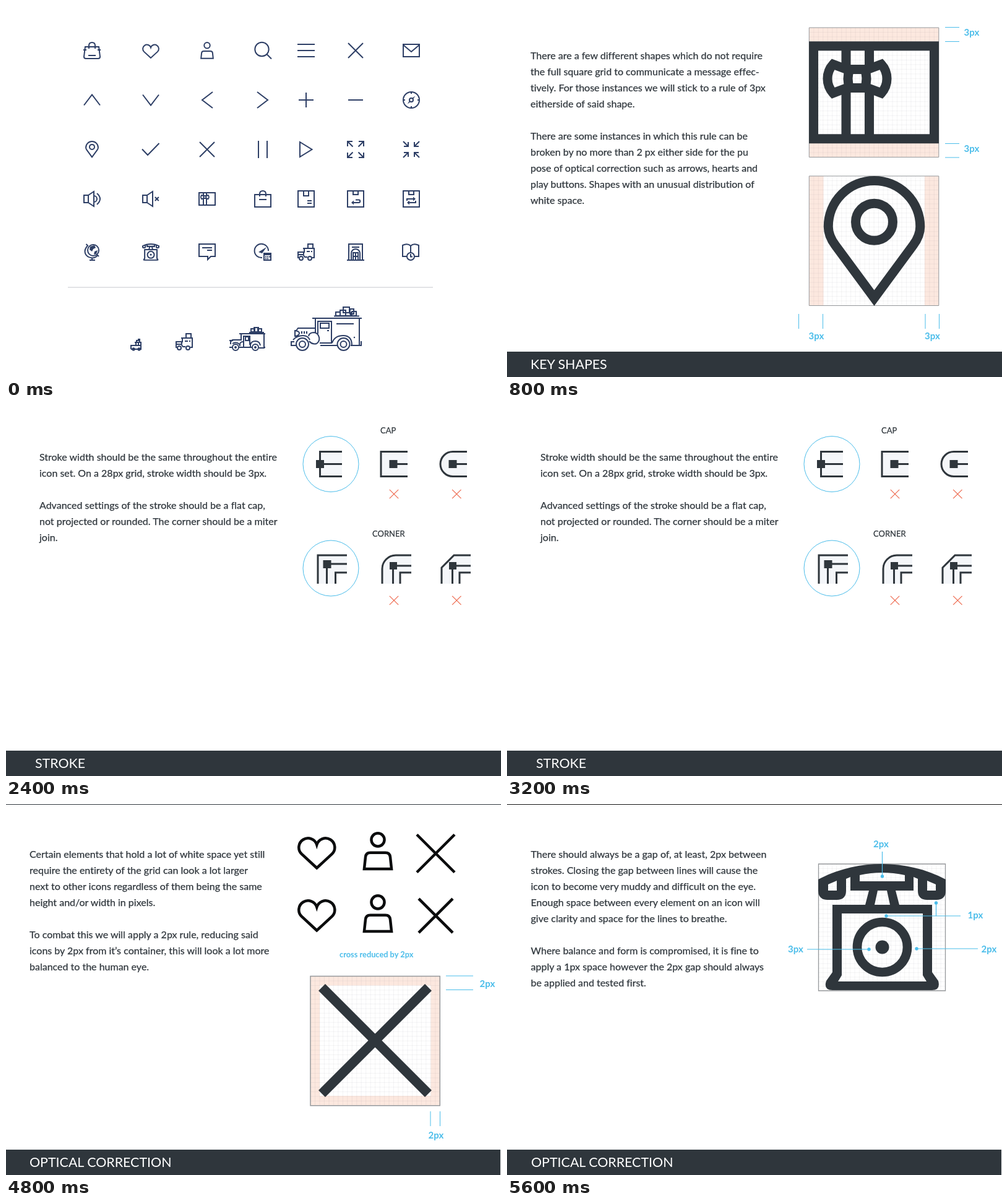
Animation, 800 px wide and 600 px high, one loop 6.4 s. Source, as an HTML page:

```html
<!DOCTYPE html>
<html lang="en">
<head>
<meta charset="utf-8">
<title>Icon guidelines</title>
<style>
html, body { margin: 0; width: 100%; height: 100%; overflow: hidden; background: #fff; }
svg { display: block; width: 800px; height: 600px; }
text { font-family: Lato, "Open Sans", sans-serif; font-variant-ligatures: none; }
.body { font-size: 16px; fill: #2f363c; stroke: #2f363c; stroke-width: .25px; }
.title { font-size: 21.4px; fill: #fff; }
.cap { font-size: 13px; fill: #2f363c; stroke: #2f363c; stroke-width: .2px; }
.note { font-size: 15px; font-weight: 700; fill: #4bbdea; }
.small { font-size: 12.8px; }
</style>
</head>
<body>
<svg id="stage" viewBox="0 0 800 600"></svg>
<script>
const DARK = '#2f363c', BLUE = '#4bbdea', NAVY = '#2e3f66', PEACH = '#fce8df', RED = '#ee6a4f';
const HOLD = 800, LOOP = 6400;

// drawing helpers
const line = (d, color, w = 1) => `<path d="${d}" fill="none" stroke="${color}" stroke-width="${w}"/>`;
const fill = (d, color) => `<path d="${d}" fill="${color}" fill-rule="evenodd"/>`;
const box = (x, y, w, h, color) => `<rect x="${x}" y="${y}" width="${w}" height="${h}" fill="${color}"/>`;
const dot = (x, y, r, color) => `<circle cx="${x}" cy="${y}" r="${r}" fill="${color}"/>`;
const ring = (x, y, r, color, w) =>
  `<circle cx="${x}" cy="${y}" r="${r}" fill="none" stroke="${color}" stroke-width="${w}"/>`;
const at = (x, y, s, inner) => `<g transform="translate(${x} ${y}) scale(${s})">${inner}</g>`;
const text = (x, y, cls, s) => `<text x="${x}" y="${y}" class="${cls}">${s}</text>`;
const rect = (x, y, w, h) => `M${x} ${y}h${w}v${h}h${-w}Z`;
const circ = (x, y, r) => `M${x - r} ${y}a${r} ${r} 0 1 0 ${2 * r} 0a${r} ${r} 0 1 0 ${-2 * r} 0Z`;
const cross = (x, y, r) =>
  `M${x - r} ${y - r}L${x + r} ${y + r}M${x + r} ${y - r}L${x - r} ${y + r}`;

const copy = (x, y, s) => s.split('\n').map((t, i) => t && text(x, y + i * 26, 'body', t)).join('');
const footer = (x, s, w = 800) => box(0, 559, w, 41, DARK) + text(x, 587, 'title', s);

function grid(x, y, size) {
  let d = '';
  for (let i = 1; i < 28; i++) {
    const p = size * i / 28;
    d += `M${x + p} ${y}v${size}M${x} ${y + p}h${size}`;
  }
  return line(d, 'rgba(40,50,60,.05)');
}
const frame = (x, y, size, w = 1) => line(rect(x, y, size, size), '#95989b', w);

// icons on a 28 unit grid, centred on 0,0
const heart = c => line('M0 12L-10.97 1.87A6.6 6.6 0 1 1 0 -4.77A6.6 6.6 0 1 1 10.97 1.87Z', c, 2);
const person = c => line(circ(0, -8.3, 4.7) +
  'M-9.8 12.7L-8.9 4.2Q-8.6 1 -5.4 1H5.4Q8.6 1 8.9 4.2L9.8 12.7Z', c, 2);
const pin = c => line('M0 12.3L-8.4 .9C-9.3 -.3 -9.9 -1.6 -9.9 -3.1A9.9 9.9 0 0 1 9.9 -3.1' +
  'C9.9 -1.6 9.3 -.3 8.4 .9Z' + circ(0, -4.1, 4), c, 2);
const wing = 'M-2 -1.9L-5.2 -3.1A4.6 4.6 0 0 0 -5.2 3.1L-2 1.9';
const gift = c => line(rect(-13, -10, 26, 20) + 'M-6 -11V-5.5M-1 -11V-5.5M-6 -.5V11M-1 -.5V11', c, 2) +
  at(-3.6, -2.95, 1, line(wing + 'M-1.6 -2H1.6Q2.4 0 1.6 2H-1.6Q-2.4 0 -1.6 -2Z', c, 2) +
  `<g transform="scale(-1 1)">${line(wing, c, 2)}</g>`);
const compass = c => line(circ(0, 0, 13) + circ(0, 0, 3) +
  'M0 -13V-10M0 13V10M-13 0H-10M13 0H10', c, 2) +
  fill('M6.4 -6.4L2 -3.4L3.4 -2ZM-6.4 6.4L-2 3.4L-3.4 2Z', c);
const quad = (d, c) => [[1, 1], [-1, 1], [1, -1], [-1, -1]]
  .map(([a, b]) => `<g transform="scale(${a} ${b})">${line(d, c, 2)}</g>`).join('');
const speaker = 'M-13 -6H-6V6H-13ZM-6 -6L3 -12V12L-6 6';
const parcel = depth => rect(-13, -13, 26, 26) + `M-4 -13V${depth}H4V-13`;
const truck = c => line(rect(3, -13, 8, 7) + 'M-5 -6H14M-3 -6V0H-13V8M13 -6V9H10M-13 4H-5L-2 8H2' +
  'M1 -1H6M8 -1H10M-4 0V4M-13 10V7' + circ(-8, 10, 3) + circ(6, 10, 3), c, 2);

// telephone on a 206 px square, centred on 606,199.5
const phone = c => fill('M503 122C535 105 570 97 606 97S677 105 709 122V140Q709 155 694 155H679' +
  'Q664 155 664 140V121L657 118V140H555V118L548 121V140Q548 155 533 155H518Q503 155 503 140Z' +
  'M519 130L533 124V140H519ZM570 115Q606 107 643 115V125H570ZM679 124L693 130V140H679Z', c) +
  fill('M585 140H599L594 163H579ZM614 140H628L634 163H619Z', c) +
  fill('M526 163H687V272L697 286Q701 301 687 301H526Q511 301 516 286L526 272Z' +
  'M541 177V277L535 287H678L672 277V177Z', c) +
  ring(606.5, 231.5, 40.5, c, 14.7) + dot(606.5, 231.5, 11, c);

function iconSheet() {
  const c = NAVY, L = d => line(d, c, 2);
  const put = (x, y, inner) => at(x, y, 1, inner);
  let s = '';

  // row 1
  s += put(139, 72, L('M-11 -6H11L13 10Q13 13 10 13H-10Q-13 13 -13 10ZM-5 -3V-8Q-5 -13 0 -13T5 -8V-3' +
    'M-6 8H6M-14 -1H-9M9 -1H14'));
  s += put(234, 72, heart(c)) + put(325, 72, person(c));
  s += L(circ(413.5, 70, 11.2) + 'M421.5 78L429 85.5');
  s += L('M471 62h28M471 72h28M471 82h28' + cross(565, 72, 12));
  s += put(655, 72, L(rect(-13, -10, 26, 20) + 'M-13 -9L0 2L13 -9'));

  // row 2
  s += L('M126 160.5L139 143.5L152 160.5M221 143.5L234 160.5L247 143.5M334 139L317 152L334 165' +
    'M406 139L423 152L406 165M473 152h24M485 140v24M553 152h24');
  s += put(655, 152, compass(c));

  // row 3
  s += put(139, 232, pin(c));
  s += L('M220 231.5L229 241L247.5 222' + cross(325, 232, 12) + 'M408 218v28M422 218v28M475 220L494.5 232L475 244Z');
  s += put(565, 232, quad('M-13 -5V-13H-5M-13 -13L-4.5 -4.5', c));
  s += put(655, 232, quad('M-13 -13L-5 -5M-5 -12V-5H-12', c));

  // row 4
  s += put(139, 312, L(speaker + 'M3 -5A5 5 0 0 1 3 5M8 -9Q18 0 8 9'));
  s += put(234, 312, L(speaker + cross(9.8, 0, 3)));
  s += put(325, 312, gift(c));
  s += put(415, 312, L(rect(-13, -7, 26, 20) + 'M-5 -4V-8Q-5 -13 0 -13T5 -8V-4M-6 1H6'));
  s += put(485, 312, L(parcel(-5) + 'M2 3H9M2 7H9'));
  s += put(565, 312, L(parcel(-7) + 'M0 1.5H5A2.2 2.2 0 0 1 5 6H-5') + fill('M-7 6L-3 2.5V9.5Z', c));
  s += put(655, 312, L(parcel(-7) + 'M-7 3V0H4M7 3V6H-4') + fill('M7 0L3 -3.5V3.5ZM-7 6L-3 2.5V9.5Z', c));

  // row 5
  s += put(139, 398, L(circ(2, -3, 9) + 'M-9.5 -13L-7 -10.5Q-13 -4 -11 2T0 9.5Q6 9.5 9 5L11 7M0 9V13M-4 13H5') +
    fill('M-3 -9L4 -11L6 -7L2 -5L0 -1L-4 -4ZM4 -1L9 -3L7 3L3 4Z', c));
  s += at(234, 398, 28 / 206, at(-606, -199.5, 1, phone(c)));
  s += put(325, 398, L('M-13 -13H13V7H6L1 12V7H-13ZM-8 -7H8M0 -3H8'));
  s += put(415, 398, L('M-1 9A11.2 11.2 0 1 1 9 -2' + rect(2, 2, 11, 11) + 'M2 4H13') +
    fill('M6 -8L-7 0L-1 2Z', c) + L('M4 7.5H6M7 7.5H9M10 7.5H12M4 10.5H6M7 10.5H9'));
  s += put(485, 398, truck(c));
  s += put(565, 398, L(rect(-11, -13, 22, 26) + 'M-14 13H14M-6 -8H6M-7 13V2A7 7 0 0 1 7 2V13' +
    'M-4 13V1H4V13M0 1V13M-4 7H4'));
  s += put(654, 398, L('M-6 7H-13V-11Q-5 -15 0 -10Q5 -15 13 -11V7H6M0 -10V1' + circ(0, 7, 6) + 'M0 3V7.5H3'));

  s += line('M100 455H690', '#e2e3e6', 2);

  // van at four sizes
  s += L('M211 543V541H214V539H216V543M208 544H219M210 544V549H202V555M218 544V555M209 549H218M214 545V549M202 555H219') +
    L(circ(206, 555, 1.8) + circ(215, 555, 1.8));
  s += put(288, 543, truck(c));
  s += L('M377 530H419M417 530V553H409M380 530V540H366L363 543V547M361 552H366M377 552H397' +
    'M395 553V548Q396 542 403 542T411 549M366 546Q372 542 377 547M384 553V534H394V548' +
    'M417 552H419M361 541H367' + rect(387, 535, 5, 6) + rect(396, 522, 6, 5) + rect(401, 520, 7, 7) +
    rect(407, 522, 6, 5) + 'M393 528H417' + circ(371, 552, 5) + circ(403, 552, 5)) +
    dot(371, 552, 2, c) + dot(403, 552, 2, c) +
    L('M378 550Q377 543 383 543');
  s += L('M495 505H575M571 505V549H557M500 505V529M574 542V549H570M530 501.5H571' +
    rect(533, 495, 7, 6) + rect(540, 492, 9, 9) + rect(545, 487, 10, 9) + rect(549, 496, 8, 5) +
    rect(556, 490, 6, 8) + rect(559, 494, 7, 7) +
    'M534 514H562M504 530V510H526V545H507M519 525H522M499 521H472L469 525M478 526V530M482 526V530M486 526V530' +
    'M461 542V549H469M461 543H466M467 524V535M467 525Q474 526 474 529Q474 533 467 534' +
    'M464 540Q470 533 480 533Q488 533 491 540M508 549H535M527 545Q531 533 545 533T559 549' +
    rect(508, 513, 14, 8) + circ(479, 547, 10) + circ(479, 547, 5) + circ(545.5, 547, 10) + circ(545.5, 547, 5) +
    'M489 534Q490 528 498 528A10 10 0 0 1 502 546Q495 548 490 542') + dot(563, 536, 1.2, c);
  return s;
}

function keyShapes() {
  return copy(38, 86, `There are a few different shapes which do not require
the full square grid to communicate a message effec-
tively. For those instances we will stick to a rule of 3px
eitherside of said shape.

There are some instances in which this rule can be
broken by no more than 2 px either side for the pu
pose of optical correction such as arrows, hearts and
play buttons. Shapes with an unusual distribution of
white space.`) +
    box(488, 35, 210, 22, PEACH) + box(488, 222, 210, 22, PEACH) +
    grid(488.3, 35, 209.5) + frame(488.3, 35, 209.5) + at(593, 139.7, 7.5, gift(DARK)) +
    box(488, 275, 23.5, 210, PEACH) + box(675, 275, 23, 210, PEACH) +
    grid(488.3, 275, 209.5) + frame(488.3, 275, 209.5) + at(593.5, 380, 7.5, pin(DARK)) +
    line('M708 34.5h23M708 57.5h23M708 222.5h23M708 245h23M471.5 498v24M510.5 498v24M676 498v24M698.5 498v24', BLUE) +
    text(738.5, 48, 'note', '3px') + text(738.5, 236, 'note', '3px') +
    text(487.5, 539, 'note', '3px') + text(675, 539, 'note', '3px') + footer(38, 'KEY SHAPES');
}

function strokes() {
  const pale = '#f4f6f9', L = d => line(d, DARK, 3);
  const knob = (x, y, r = 6.5) => box(x - r, y - r, 2 * r, 2 * r, DARK);
  const shape = d => fill(d, pale) + L(d);
  return copy(54, 90, `Stroke width should be the same throughout the entire
icon set. On a 28px grid, stroke width should be 3px.

Advanced settings of the stroke should be a flat cap,
not projected or rounded. The corner should be a miter
join.`) +
    ring(525, 95.5, 45, BLUE, 1) + ring(525, 264, 45, BLUE, 1) +
    text(605, 46, 'cap', 'CAP') + text(592, 213, 'cap', 'CORNER') +
    shape('M543 75.5H507.5V115.5H543') + L('M507 95.5H543') + knob(507.5, 95.5) +
    shape('M649 75.5H606V115.5H649') + L('M626 95.5H649') + knob(626, 95.5) +
    shape('M745 75.5H722A20 20 0 0 0 722 115.5H745') + L('M722 95.5H745') + knob(722, 95.5) +
    fill('M504 289V243H551V271H532.5V289Z', pale) +
    L('M504 289V243H551M518.5 289V257H551M532.5 289V271H551') + knob(519, 257.5) +
    fill('M608 289V265A22 22 0 0 1 630 243H655V271H637V289Z', pale) +
    L('M608 289V265A22 22 0 0 1 630 243H655M625.5 289V260H655M637 289V271H655') + knob(626, 260, 6) +
    fill('M704 289V263L724 243H751V271H733V289Z', pale) +
    L('M704 289V263L724 243H751M721.5 289V260H751M733 289V271H751') + knob(722, 260, 6) +
    line(cross(627, 144, 7.2) + cross(728.3, 144, 7.2) + cross(627, 316, 7.2) + cross(728.3, 316, 7.2), RED, 1.2) +
    footer(47, 'STROKE');
}

function pointers() {
  return copy(38, 86, `Although all stroke widths and cap sizes are the same,
there is a rare opportunity to add a touch of vintage
character to any object which requires a pointer such
as a compass or clock.

Pointers should taper from the middle point of the icon
to the end creating a point, at it’s widest edge, the
pointer should be the same width as
the rest of the icon stroke, 3px.`) +
    grid(488.5, 40, 209.5) + frame(488.5, 40, 209.5) +
    dot(593, 144.3, 28, '#fff') + at(593, 144.3, 7.5, compass(DARK)) +
    fill('M683 321L547 418L586 457Z', DARK) +
    line('M503 462L534.5 430.5M542.5 499L574 467.5', BLUE, 1.2) +
    text(503, 493, 'note', '3px') + footer(38, 'POINTERS');
}

function whiteSpace() {
  const ink = '#0b0c0d';
  const row = y => at(502.3, y, 2.25, heart(ink)) + at(601, y, 2.25, person(ink));
  return box(0, 0, 800, 1, DARK) + copy(38, 87, `Certain elements that hold a lot of white space yet still
require the entirety of the grid can look a lot larger
next to other icons regardless of them being the same
height and/or width in pixels.

To combat this we will apply a 2px rule, reducing said
icons by 2px from it’s container, this will look a lot more
balanced to the human eye.`) +
    row(76.5) + row(177.5) +
    line(cross(694.5, 80, 30.5) + cross(694.5, 180.7, 27.5), ink, 4.5) +
    text(539, 248, 'note small', 'cross reduced by 2px') +
    box(492, 278.5, 209.5, 209.5, PEACH) + box(507, 293.5, 179.5, 178.5, '#fff') +
    grid(492, 278.5, 209.3) + frame(492, 278.5, 209.3, 1.5) +
    line(cross(596.5, 382.5, 86), DARK, 15.5) +
    line('M711 278h44M711 300.5h44M686 497v24M701.5 497v24', BLUE) +
    text(765.5, 295.5, 'note', '2px') + text(682.5, 541, 'note', '2px') +
    footer(38, 'OPTICAL CORRECTION', 799);
}

function gaps() {
  return box(0, 0, 800, 1, '#111') + copy(38.5, 87, `There should always be a gap of, at least, 2px between
strokes. Closing the gap between lines will cause the
icon to become very muddy and difficult on the eye.
Enough space between every element on an icon will
give clarity and space for the lines to breathe.

Where balance and form is compromised, it is fine to
apply a 1px space however the 2px gap should always
be applied and tested first.`) +
    grid(503.5, 97, 205) + frame(503.5, 97, 205, 1.3) + phone(DARK) +
    line('M606.5 77V117M485 235H585M613 181H733M693.5 160V181M662 234H761', BLUE, 1.2) +
    [[606.5, 117], [585, 235], [613, 181], [693.5, 160], [662, 234]]
      .map(([x, y]) => dot(x, y, 2.7, BLUE)).join('') +
    text(592, 70, 'note', '2px') + text(454, 240, 'note', '3px') +
    text(744.5, 185, 'note', '1px') + text(766.5, 240, 'note', '2px') +
    footer(39, 'OPTICAL CORRECTION', 799);
}

const sheet = iconSheet(), keys = keyShapes(), stroke = strokes();
const slides = [sheet, keys, keys, stroke, stroke, pointers(), whiteSpace(), gaps()];
const stage = document.getElementById('stage');
let shown = '';

function draw(ms) {
  const slide = slides[Math.floor(ms % LOOP / HOLD)];
  if (slide !== shown) stage.innerHTML = shown = slide;
}

const start = performance.now();
function tick() {
  draw(performance.now() - start);
  requestAnimationFrame(tick);
}
tick();
</script>
</body>
</html>
```
